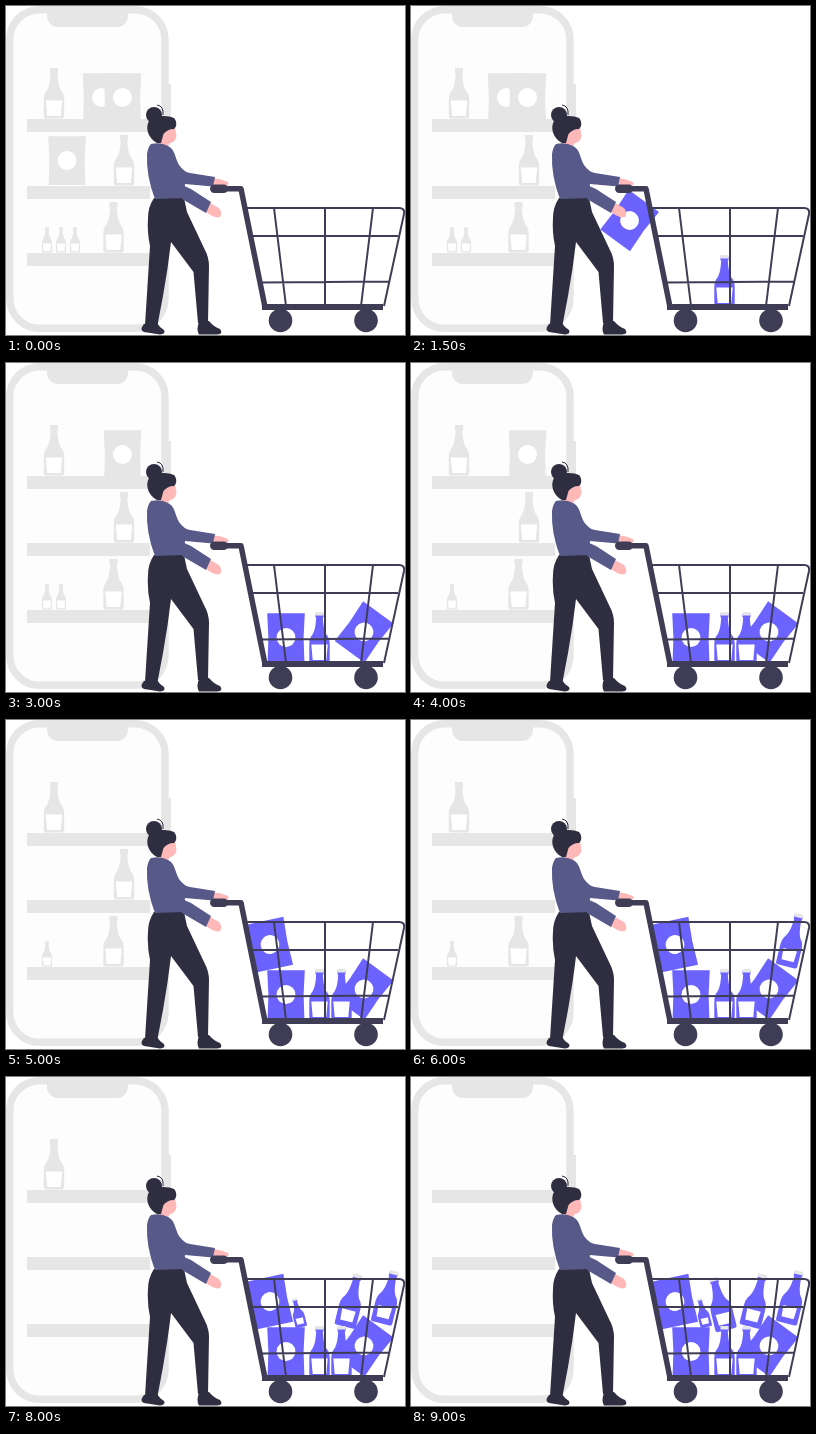
Write an HTML page that moves like this. It is 399 by 329 pixels and loops after 9500 ms.

```html
<!DOCTYPE html>
<html lang="en">
<head>
<meta charset="utf-8">
<title>Shopping cart</title>
<style>
  html, body { margin: 0; width: 100%; height: 100%; overflow: hidden; background: #fff; }
  svg { display: block; }
  .grey { color: #e6e6e6; }
  .violet { color: #6c63ff; }
  .dark { fill: #2f2e41; }
  .shirt { fill: #575a89; }
  .skin { fill: #ffb8b8; }
  .wire { fill: none; stroke: #3f3d56; stroke-width: 2; }
</style>
</head>
<body>
<svg width="399" height="329" viewBox="0 0 399 329">
  <defs>
    <g id="glass">
      <path fill="currentColor" d="M-4-24H4V-20H3.3C4-10 5-5 8.5-1Q10.2 2 10.2 6V23Q10.2 25 8 25H-8Q-10.2 25-10.2 23V6Q-10.2 2-8.5-1C-5-5-4-10-3.3-20H-4Z"/>
      <path fill="#e6e6e6" d="M-4-25.5H4V-22H-4Z"/>
    </g>
    <g id="bottle">
      <use href="#glass"/>
      <path fill="#fff" d="M-8.2 7H8.2L6.8 22.500H-6.8Z"/>
    </g>
    <g id="leaning">
      <use href="#glass"/>
      <path fill="#fff" d="M-6.500 9H6.500L5.800 19.500H-5.800Z"/>
    </g>
    <g id="box">
      <path fill="currentColor" d="M-18.8-24.3H18.8L17.6 0L18.4 24.5H-18.4L-17.6 0Z"/>
      <circle r="9.4" fill="#fff"/>
    </g>
  </defs>

  <!-- phone -->
  <rect x="3.700" y="3.700" width="155.300" height="318.600" rx="30" fill="#fdfdfd" stroke="#e6e6e6" stroke-width="7.400"/>
  <g fill="#e6e6e6">
    <path d="M41 4H122V10A11 11 0 0 1 111 21H52A11 11 0 0 1 41 10Z"/>
    <path d="M162 78H165V130H162Z"/>
    <path d="M21 113H144V126H21ZM21 180H144V193H21ZM21 247H144V260H21Z"/>
  </g>
  <g id="shelf" class="grey"></g>

  <!-- woman -->
  <path class="dark" d="M148 192H178L181 206L198 242Q203 251 203 260L202 317H192L187.500 266L165 236Q162 262 157 290L151.500 319H139L144 240Q141 226 142 212Q142 201 148 192Z"/>
  <path class="dark" d="M138 318L151 317Q154 322 158 324Q160 328 154 328.500L138 326Q133 324 138 318Z"/>
  <path class="dark" d="M193 316L203 315Q208 321 214 323Q218 328 211 328.500H193Q190 323 193 316Z"/>
  <path class="skin" d="M154 128L169 121L170.500 130Q169 137 164 137L160 142H151Z"/>
  <path class="dark" d="M143 115C148 109 162 109 168 112C171 115 171 121 168 123C163 123 160 125 157.500 128L155 137H151C142 132 139 122 143 115Z"/>
  <circle class="dark" cx="148" cy="109" r="8"/>
  <path d="M151 99Q158 100 157 109" fill="none" stroke="#2f2e41"/>
  <path class="skin" d="M207 172L215 173.500L222 176Q224 180 219 180H207Z"/>
  <path class="shirt" d="M145 138Q155 136 162 140C169 143 169 152 173 159Q178 166 184 167L209 171L207 180.500L179 178L178 192L149 193Q140 170 141 148Q142 141 145 138Z"/>

  <g id="hand" class="violet"></g>

  <path class="skin" d="M204 197L213 202Q217 207 214 211Q209 213 200 206Z"/>
  <path class="shirt" d="M176 179L185 183L205 196L200 207L176 193Z"/>

  <g id="boxes" class="violet"></g>
  <g id="bottles" class="violet"></g>

  <!-- cart -->
  <g class="wire">
    <path d="M241 202H393Q399 202 398 208L378 300M246 230H392M256 276.500L383 275.500M319 202V300M268 202L280 300M367 202L355 300"/>
    <path stroke-width="5.500" stroke-linejoin="round" d="M212 182.700H235L259 301"/>
    <path stroke-width="6" d="M256 301H377"/>
  </g>
  <g fill="#3f3d56">
    <rect x="204" y="178.500" width="18" height="8.500" rx="4.200"/>
    <circle cx="274.500" cy="314.500" r="11.800"/>
    <circle cx="360" cy="314.500" r="11.800"/>
  </g>
</svg>
<script>
  const STEP = 500, LOOP = 9500;

  // Places in the phone: standing on one of three evenly spaced boards.
  const onShelf = (row, x, size = 1, drop = 0) => ({ x, y: 112.5 + 67 * row - 25 * size + drop, size });
  const smallBottle = n => onShelf(2, 41 + 14 * n, .5);

  // Places in the cart: upright on its floor, or leaning along the rim.
  const onFloor = x => ({ x, y: 274.5 });
  const floorBottle = n => onFloor(313.5 + 22 * n);
  const rimBottle = n => ({ x: 309 + 36.3 * n, y: 227 - 3.3 * n, tilt: n ? 14 : -14, size: 1.07 });

  const inHand = {
    box: { x: 218.5, y: 214.5, tilt: 36 },
    bottle: { x: 207, y: 213, tilt: 14 }
  };

  // In the order they are picked.
  const items = [
    ['bottle', smallBottle(2), floorBottle(0)],
    ['box', onShelf(1, 61), { x: 358, y: 269, tilt: 36 }],
    ['box', onShelf(0, 95.5, 1, 4), onFloor(280)],
    ['bottle', smallBottle(1), floorBottle(1)],
    ['box', onShelf(0, 116.5, 1, 4), { x: 264, y: 224.5, tilt: -12 }],
    ['bottle', onShelf(1, 118), rimBottle(2)],
    ['bottle', smallBottle(0), { x: 292, y: 236, tilt: -14, size: .58 }],
    ['bottle', onShelf(2, 107.5), rimBottle(1)],
    ['bottle', onShelf(0, 48), rimBottle(0)]
  ];

  const layer = id => document.getElementById(id);

  function place(kind, { x, y, tilt = 0, size = 1 }) {
    const shape = kind === 'bottle' && tilt ? 'leaning' : kind;
    const el = document.createElementNS('http://www.w3.org/2000/svg', 'use');
    el.setAttribute('href', '#' + shape);
    el.setAttribute('transform', `translate(${x} ${y}) rotate(${tilt}) scale(${size})`);
    return el;
  }

  const parts = items.map(([kind, shelf, cart]) => {
    const held = { ...inHand[kind], size: cart.size };
    const views = [shelf, held, cart].map(spot => place(kind, spot));
    layer('shelf').append(views[0]);
    layer('hand').append(views[1]);
    layer(kind === 'box' ? 'boxes' : 'bottles').prepend(views[2]);
    return views;
  });

  const start = performance.now();
  let shown = -1;

  // Each item takes two steps: into the hand, then into the cart.
  function draw(step) {
    parts.forEach((views, i) => {
      const stage = Math.max(0, Math.min(2, step - 2 * i));
      views.forEach((el, n) => { el.style.display = n === stage ? '' : 'none'; });
    });
    shown = step;
  }

  function tick() {
    const step = Math.floor((performance.now() - start) % LOOP / STEP);
    if (step !== shown) draw(step);
    requestAnimationFrame(tick);
  }
  tick();
</script>
</body>
</html>
```
